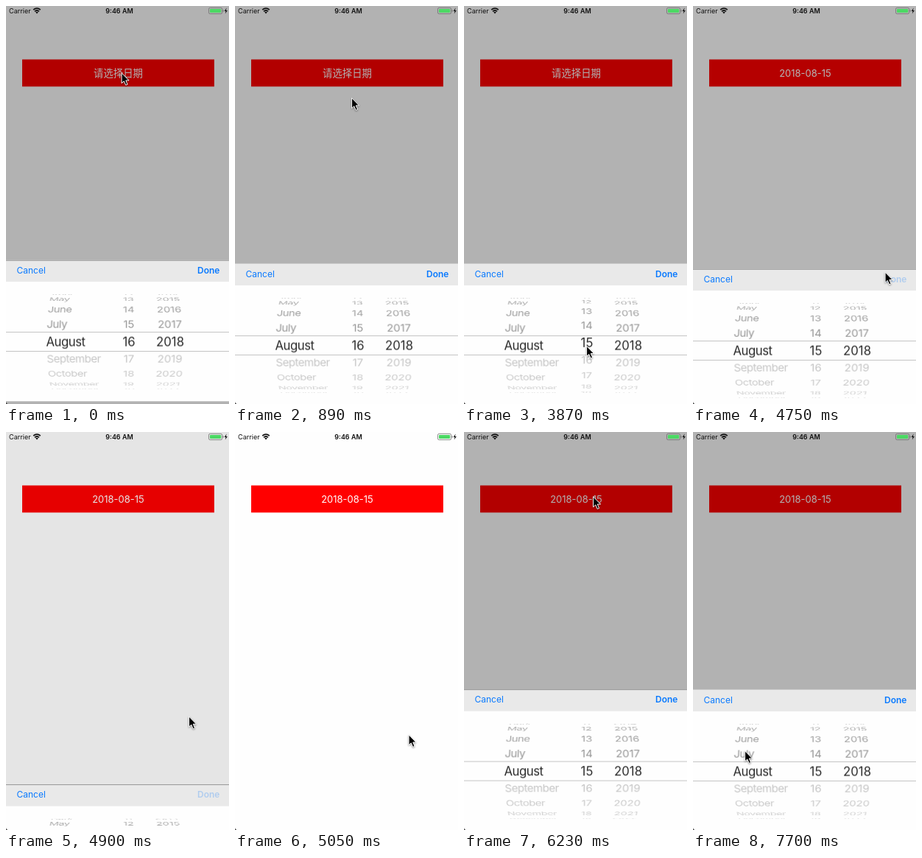
An HTML page for the animation above (8000 ms loop, 303 by 540 pixels).

```html
<!DOCTYPE html>
<html lang="zh-CN">
<head>
<meta charset="utf-8">
<title>Date picker</title>
<style>
html, body { margin: 0; width: 100%; height: 100%; overflow: hidden; background: #fefefe; }
body { position: relative; font-family: Inter, "Noto Sans CJK SC", "Noto Sans CJK JP", sans-serif; }
div, span, svg { position: absolute; left: 0; top: 0; white-space: nowrap; }
#title { top: 73px; width: 305px; text-align: center; color: #fff; line-height: 36px; }
#dim { inset: 0; background: #000; }
#status { font-size: 9.1px; line-height: 14px; color: #111; }
#time { width: 308px; text-align: center; font-size: 9px; font-weight: 600; }
#sheet { width: 303px; height: 192px; }
#sheet > span { font-size: 12px; line-height: 28px; color: #0a7aff; }
#cancel { left: 14.5px; }
#done { left: auto; right: 12.6px; font-weight: 600; }
#wheel { top: 30px; width: 303px; height: 161px; perspective: 810px; perspective-origin: 152px 81px; }
#wheel span { top: 69px; height: 24px; line-height: 24px; font-size: 15px; color: #000; }
#wheel .on { font-size: 16.8px; }
#wheel .month { left: 54.5px; letter-spacing: -.03em; }
#wheel .day { left: 147px; width: 40px; text-align: center; }
#wheel .year { left: 193px; width: 60px; text-align: center; }
#cursor { overflow: visible; filter: drop-shadow(0 1px 1px #0006); }
</style>
</head>
<body>
<svg width="303" height="120"><rect x="22" y="72.5" width="261" height="36.8" fill="#f00"/></svg>
<div id="title"></div>
<div id="dim"></div>
<div id="sheet">
  <svg width="303" height="192">
    <rect width="303" height="192" fill="#fefefe"/>
    <rect width="303" height="29.5" fill="#e9e9e9"/>
    <rect id="edge" width="303" height=".9" fill="#707070"/>
    <path d="M0 97.9H303M0 123.9H303" stroke="#c4c4c4"/>
  </svg>
  <span id="cancel">Cancel</span>
  <span id="done">Done</span>
  <div id="wheel"></div>
</div>
<div id="status">
  <span style="left:4px">Carrier</span>
  <span id="time">9:46 AM</span>
  <svg width="303" height="14">
    <path d="M37.2 5.2Q42 1 46.8 5.2M39 7.3Q42 4.7 45 7.3" fill="none" stroke="#111" stroke-width="1.7"/>
    <path d="M40.2 8.4Q42 7 43.8 8.4L42 10.4Z" fill="#111"/>
    <rect x="275.5" y="2.4" width="18.2" height="8.2" rx="1.8" fill="none" stroke="#707070" stroke-width=".8"/>
    <rect x="277" y="3.9" width="15.2" height="5.2" rx=".8" fill="#4cd964"/>
    <path d="M294.6 5v3q1.2-.4 1.2-1.5t-1.2-1.5" fill="#707070"/>
    <path d="M299.6 2.6L296.8 7h1.8l-.8 3.6L300.9 6h-1.9Z" fill="#111"/>
  </svg>
</div>
<svg width="4" height="4" style="top:auto;bottom:0"><path d="M0 1Q.3 3.5 2.5 4H0Z" fill="#333"/></svg>
<svg id="cursor" width="14" height="20">
  <path d="M.6 .8V14.8L3.8 11.9L6.2 17.4L8.6 16.4L6.3 11H10.6Z" stroke="#fff"/>
</svg>
<script>
// All motion is sampled in steps, as a screen recorder would see it.
const LOOP = 8000, STEP = 148.2, LAST = 52;
const REST = 349.6, HEIGHT = 192;
const RADIUS = 69.7, ROW_ANGLE = 19.8;
const DRAG = [23, 27], PRESS = 31, CLOSE = [31.77, 33.77], REOPEN = 42;
const MONTHS = ['April', 'May', 'June', 'July', 'August', 'September', 'October', 'November', 'December'];

// Pointer moves: first step, last step, x, y
const MOVES = [
  [5, 6, 158, 124], [6, 8, 124, 455], [9, 11, 90, 439], [12, 15, 174, 440],
  [17, 18, 176, 438], [18, 22, 166, 442], [...DRAG, 166, 464], [28, PRESS, 260.5, 360.5],
  [32, 34, 235.5, 410], [34, 40, 175, 87], [42, 47, 178, 445], [48, LAST, 70, 432]
];

const $ = id => document.getElementById(id);

function ease(from, to, k) {
  const f = Math.min(1, Math.max(0, (k - from) / (to - from)));
  return f * f * (3 - 2 * f);
}

function pointer(k) {
  let x = 156.5, y = 90;
  for (const [from, to, nextX, nextY] of MOVES) {
    const f = ease(from, to, k);
    x += (nextX - x) * f;
    y += (nextY - y) * f;
  }
  return `translate(${x}px,${y}px)`;
}

// Rows sit on a cylinder; they fade as they turn away.
function column(name, value, label) {
  const mid = Math.round(value);
  let html = '';
  for (let n = mid - 4; n <= mid + 4; n++) {
    const d = n - value, angle = -d * ROW_ANGLE, on = Math.abs(d) < .5;
    const turn = Math.max(0, Math.cos(angle * Math.PI / 180));
    const alpha = on ? .84 : (d < 0 ? .42 : .23) * turn ** .4;
    html += `<span class="${name}${on ? ' on' : ''}" style="opacity:${alpha};transform:` +
      `translateZ(${-RADIUS}px) rotateX(${angle}deg) translateZ(${RADIUS}px)">${label(n)}</span>`;
  }
  return html;
}

function draw(k) {
  const reopened = k >= REOPEN;
  const closing = reopened ? 0 : ease(...CLOSE, k);
  const age = reopened ? k - REOPEN + 1 : k;
  const bounce = Math.round(-50 * Math.exp(-2.5 * age)) / 10;
  const picked = k > PRESS;

  $('title').textContent = picked ? '2018-08-15' : '请选择日期';
  $('title').style.fontSize = picked ? '13px' : '13.4px';
  $('dim').style.opacity = .3 * (1 - closing);
  $('sheet').style.transform = `translateY(${REST + bounce + HEIGHT * closing}px)`;
  $('edge').style.opacity = bounce || closing ? 1 : 0;
  $('done').style.opacity = k >= PRESS && !reopened ? .25 : 1;
  $('wheel').innerHTML = column('month', 4, n => MONTHS[n]) +
    column('day', 16 - ease(...DRAG, k), n => n) + column('year', 2018, n => n);
  $('cursor').style.transform = pointer(k);
}

let lastStep = -1;
const start = performance.now();
function tick() {
  const t = (performance.now() - start) % LOOP;
  const k = Math.min(LAST, Math.floor((t + 9) / STEP));
  if (k !== lastStep) draw(lastStep = k);
  requestAnimationFrame(tick);
}
tick();
</script>
</body>
</html>
```
